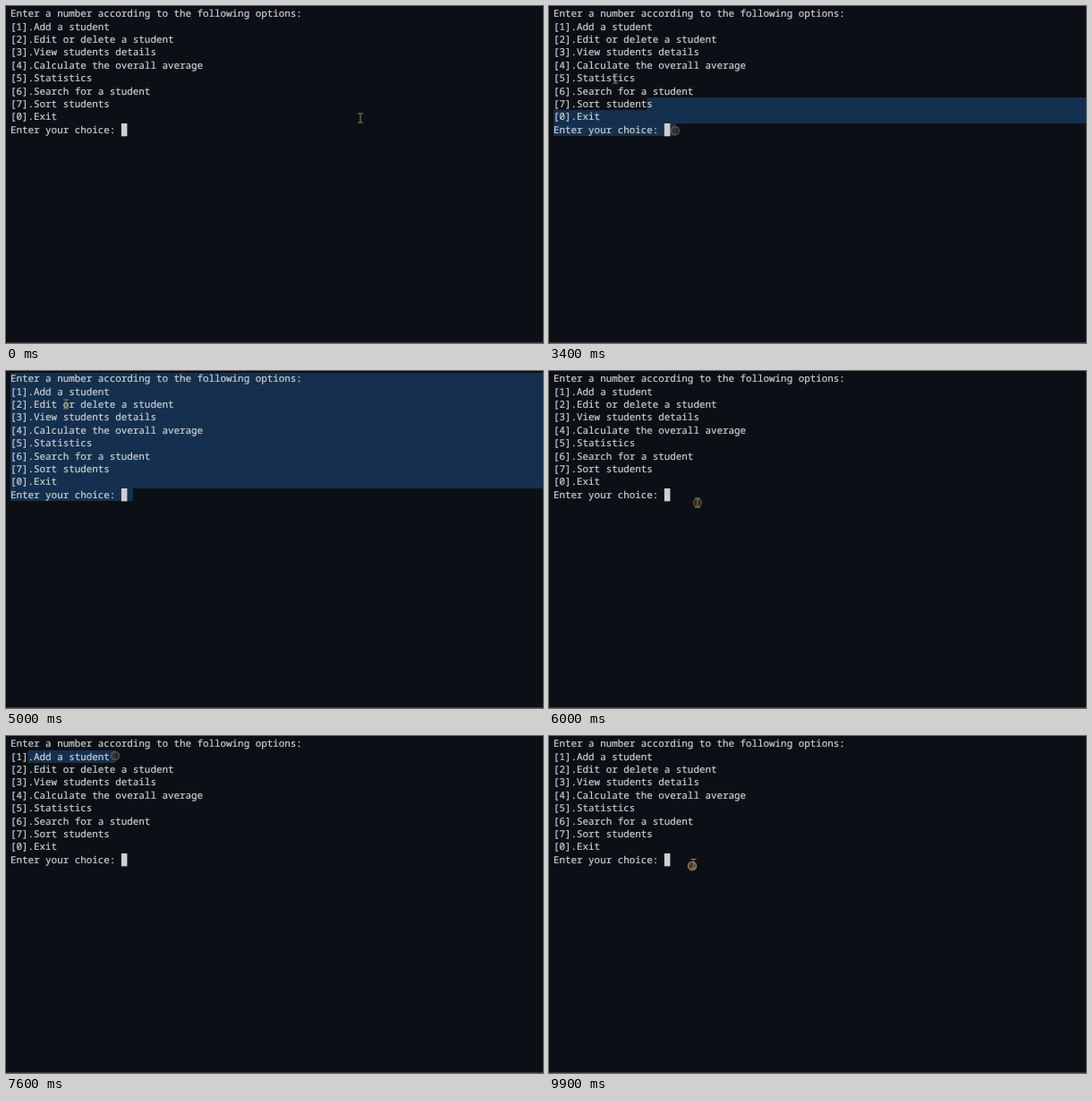
An HTML page with a canvas for the animation above (10 s loop, 600x376 px).

```html
<!DOCTYPE html>
<html lang="en">
<head>
<meta charset="utf-8">
<title>Student menu</title>
<style>
html, body { margin: 0; width: 100%; height: 100%; overflow: hidden; background: #0c1016; }
canvas { display: block; }
</style>
</head>
<body>
<canvas id="stage" width="600" height="376"></canvas>
<script>
const ctx = document.getElementById('stage').getContext('2d');
const LOOP = 10000, LEFT = 5, TOP = 1.6, CHAR = 6.52, ROW = 14.36;
const lines = [
  'Enter a number according to the following options:',
  '[1].Add a student',
  '[2].Edit or delete a student',
  '[3].View students details',
  '[4].Calculate the overall average',
  '[5].Statistics',
  '[6].Search for a student',
  '[7].Sort students',
  '[0].Exit',
  'Enter your choice: '
];

// Pointer stops: time, x, y
const path = [
  [0, 396, 125], [1800, 396, 125], [1900, 397, 145], [2300, 390, 178],
  [3000, 80, 60], [3200, 141, 139], [3300, 141, 139], [3400, 74, 81],
  [4100, 0, 8], [4600, 190, 110], [5000, 67, 37], [5900, 166, 147],
  [6400, 166, 147], [6900, 288, 110], [7500, 122, 22], [7600, -74, 20],
  [8200, 270, 70], [9600, 160, 145], [LOOP, 162, 142]
];
const drags = [
  { press: 3300, release: 4100, clear: 5900 },
  { press: 7500, release: 7700, clear: 9600 }
];
const clicks = drags.flatMap(d => [d.press, d.clear]);

const colX = col => LEFT + col * CHAR;
const rowY = row => Math.round(TOP + row * ROW);

function pointerAt(t) {
  const i = path.findIndex(p => p[0] > t);
  const [t0, x0, y0] = path[i - 1], [t1, x1, y1] = path[i];
  const u = (t - t0) / (t1 - t0), k = u * u * (3 - 2 * u);
  return [x0 + (x1 - x0) * k, y0 + (y1 - y0) * k];
}

function cellAt(t) {
  const [x, y] = pointerAt(t);
  return [Math.floor((y - TOP) / ROW), Math.max(0, Math.round((x - LEFT) / CHAR))];
}

// The selection runs from the pressed cell back to the pointer, which it trails.
function drawSelection(t) {
  const drag = drags.find(d => t >= d.press && t < d.clear);
  if (!drag) return;
  const [row1, col1] = cellAt(drag.press);
  const [row0, col0] = cellAt(Math.max(drag.press, Math.min(t, drag.release) - 50));
  ctx.fillStyle = '#15304f';
  for (let row = row0; row <= row1; row++) {
    const x = row === row0 ? colX(col0) : LEFT;
    const end = row === row1 ? colX(col1) : 600;
    ctx.fillRect(x, rowY(row), end - x, rowY(row + 1) - rowY(row));
  }
}

function drawText() {
  ctx.font = '500 10.87px "Noto Sans Mono", "DejaVu Sans Mono", monospace';
  ctx.textRendering = 'geometricPrecision';
  ctx.fillStyle = ctx.strokeStyle = '#cdd0d1';
  ctx.lineWidth = 0.2;
  lines.forEach((line, i) => {
    const y = TOP + i * ROW + 10.8;
    ctx.fillText(line, LEFT, y);
    ctx.strokeText(line, LEFT, y);
  });
  ctx.fillRect(colX(19), rowY(9), CHAR, ROW);
}

function drawClicks(t) {
  for (const start of clicks) {
    const age = t - start;
    if (age < 0 || age >= 400) continue;
    const [x, y] = pointerAt(start);
    ctx.globalAlpha = Math.min(1, 0.25 + age / 400);
    ctx.strokeStyle = '#94745a';
    ctx.fillStyle = '#4a3b32';
    ctx.lineWidth = 1.5;
    ctx.beginPath();
    ctx.arc(x, y, 4.5, 0, 7);
    ctx.fill();
    ctx.stroke();
    ctx.globalAlpha = 1;
  }
}

function drawPointer(t) {
  const [x, y] = pointerAt(t);
  ctx.lineWidth = 1;
  ctx.strokeStyle = '#8a8455';
  ctx.beginPath();
  for (const side of [-5, 5]) {
    ctx.moveTo(x - 3, y + side);
    ctx.lineTo(x + 3, y + side);
  }
  ctx.moveTo(x, y - 5);
  ctx.lineTo(x, y + 5);
  ctx.stroke();
}

function draw(now) {
  const t = Math.floor(now % LOOP / 100) * 100;
  ctx.fillStyle = '#0c1016';
  ctx.fillRect(0, 0, 600, 376);
  ctx.fillStyle = '#34383d';
  ctx.fillRect(0, 375, 600, 1);
  drawSelection(t);
  drawText();
  drawClicks(t);
  drawPointer(t);
  requestAnimationFrame(draw);
}
requestAnimationFrame(draw);
</script>
</body>
</html>
```
